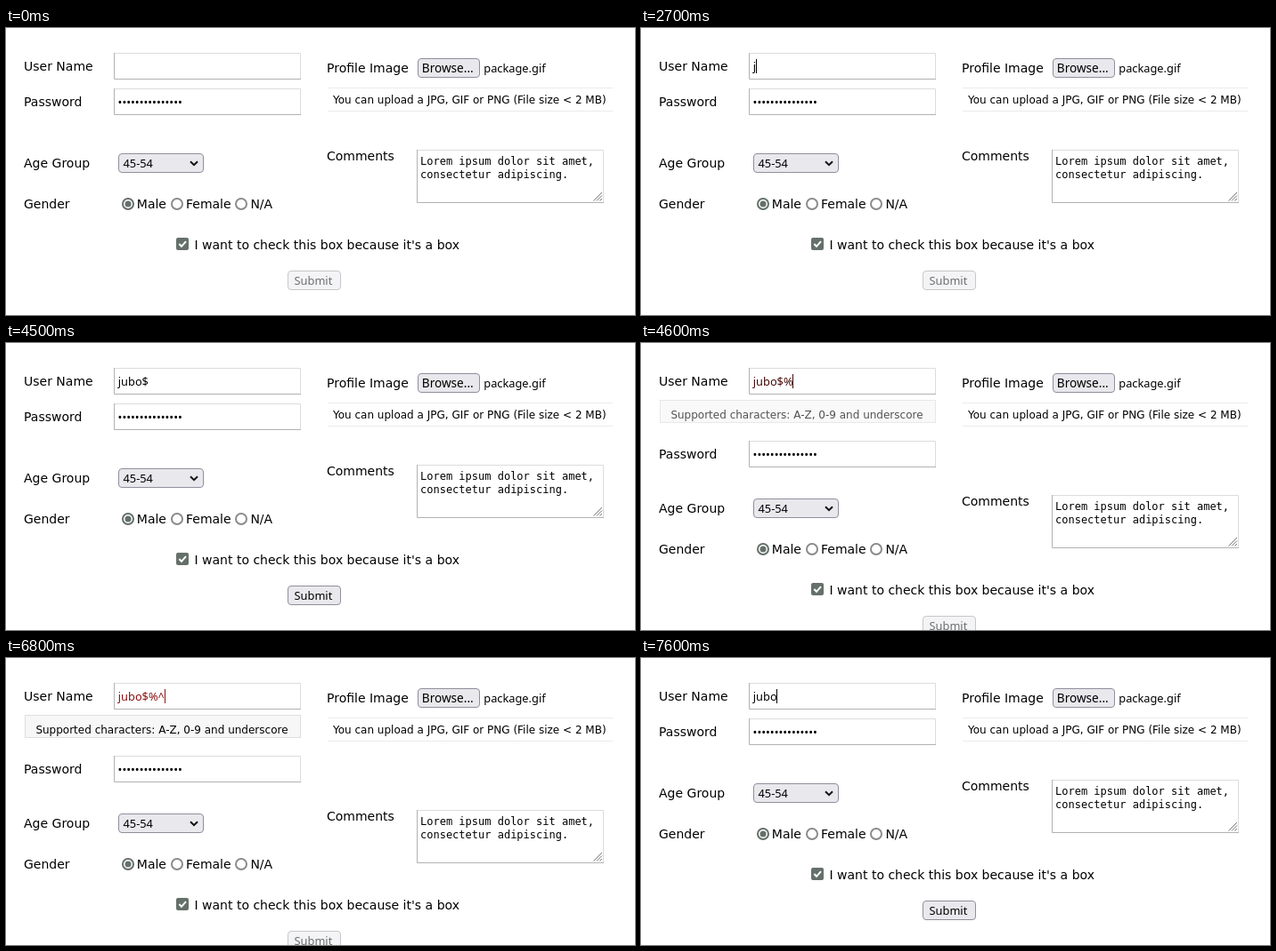
An HTML page that plays this animation: 706x323 px, repeating every 8000 ms.

```html
<!DOCTYPE html>
<html lang="en">
<head>
<meta charset="utf-8">
<title>Form validation</title>
<style>
  html, body { margin: 0; width: 100%; height: 100%; overflow: hidden; background: #fff; }
  svg { display: block; width: 706px; height: 323px; }
  text { white-space: pre; }
  .label { font: 14px "DejaVu Sans", sans-serif; }
  .note { font: 12px "DejaVu Sans", sans-serif; }
  .mono { font: 12px "DejaVu Sans Mono", monospace; }
  .ui { font: 12.8px "Noto Sans", sans-serif; }
  .light, .dark, .ring, .mark { fill: none; }
  .light { stroke: #dcdcdc; }
  .dark { stroke: #b2b2b2; }
  .button { fill: #e9e9ed; stroke: #8f8f9d; }
  .ring { stroke: #8b8b8b; stroke-width: 2; }
  .accent { fill: #65706a; }
  .ring.on { stroke: #65706a; }
  .mark { stroke-width: 2; }
  .off .button { fill: #f4f4f6; stroke: #c7c7cb; }
  .off text { fill: #6b6f6f; }
</style>
</head>
<body>
<svg viewBox="0 0 706 323">
  <defs>
    <g id="field">
      <path class="light" d="M0 .5H209.5V30"/>
      <path class="dark" d="M.5 0V29.5H210"/>
    </g>
  </defs>

  <text class="label" x="20" y="48">User Name</text>
  <use href="#field" x="121" y="28"/>
  <text class="ui" id="name" x="125.8" y="48"></text>
  <rect id="caret" y="35" width="1" height="16"/>

  <g id="hint">
    <rect x="21.5" y="64.5" width="309" height="25" fill="#f7f7f7" stroke="#dedede"/>
    <text class="note" x="33.4" y="81" dy="4">Supported characters: A-Z, 0-9 and underscore</text>
  </g>

  <text class="label" x="360" y="50">Profile Image</text>
  <rect class="button" x="462.5" y="34.5" width="69" height="21" rx="3.5"/>
  <text class="ui" x="466.8" y="50" style="font-size:13.6px">Browse...</text>
  <text class="ui" x="536.3" y="50">package.gif</text>
  <path d="M361 67.5H681M361 93.5H681" stroke="#ebebeb"/>
  <text class="note" x="367" y="85">You can upload a JPG, GIF or PNG (File size &lt; 2 MB)</text>

  <g id="password">
    <text class="label" x="20" y="88">Password</text>
    <use href="#field" x="121" y="68"/>
    <text class="ui" x="125.6" y="88">•••••••••••••••</text>
  </g>

  <g id="rest">
    <text class="label" x="20" y="157">Age Group</text>
    <rect class="button" x="126.5" y="141.5" width="95" height="21" rx="3.5"/>
    <text class="ui" x="131.5" y="157">45-54</text>
    <path class="mark" d="M207 150.2L211 154.2L215 150.2" stroke="#111"/>

    <text class="label" x="20" y="203">Gender</text>
    <circle class="ring on" cx="137" cy="198" r="6"/>
    <circle class="accent" cx="137" cy="198" r="3.5"/>
    <text class="label" x="146.8" y="203">Male</text>
    <circle class="ring" cx="192" cy="198" r="6"/>
    <text class="label" x="202" y="203">Female</text>
    <circle class="ring" cx="264" cy="198" r="6"/>
    <text class="label" x="274.4" y="203">N/A</text>

    <text class="label" x="360" y="149">Comments</text>
    <path class="light" d="M461 137.5H670.5V197"/>
    <path class="dark" d="M461.5 137V196.5H671"/>
    <text class="mono" x="465" y="154">Lorem ipsum dolor sit amet,</text>
    <text class="mono" x="465" y="169">consectetur adipiscing.</text>
    <path d="M659.5 194.5L669 185M663 194.5L669 188.5M666.5 194.5L669 192" stroke="#777"/>

    <rect class="accent" x="191" y="236" width="14" height="14" rx="2"/>
    <path class="mark" d="M194.3 243L197 245.8L202 240.2" stroke="#fff"/>
    <text class="label" x="211.5" y="249">I want to check this box because it's a box</text>

    <g id="submit">
      <rect class="button" x="316.5" y="273.5" width="59" height="21" rx="3.5"/>
      <text class="ui" x="323.6" y="289">Submit</text>
    </g>
  </g>
</svg>

<script>
const LOOP = 8000;
const ENTRY = 'jubo$%^&*';

// start ms, typed characters, caret shown, text colour, hint opacity, submit enabled
const STEPS = [
  [0, 0, 0, '#000', 0, 0],
  [900, 0, 1, '#000', 0, 0],
  [2100, 0, 0, '#000', 0, 0],
  [2700, 1, 1, '#000', 0, 0],
  [2800, 1, 1, '#000', 0, 1],
  [3000, 2, 1, '#000', 0, 1],
  [3300, 3, 0, '#000', 0, 1],
  [3400, 3, 1, '#000', 0, 1],
  [3600, 4, 1, '#000', 0, 1],
  [4400, 5, 1, '#000', 0, 1],
  [4500, 5, 0, '#000', 0, 1],
  [4600, 6, 1, '#450808', .68, 0],
  [4800, 8, 1, '#650c0c', .9, 0],
  [4900, 9, 1, '#7c1010', 1, 0],
  [5700, 9, 0, '#851212', 1, 0],
  [6600, 8, 1, '#851212', 1, 0],
  [6800, 7, 1, '#8b1212', 1, 0],
  [7000, 6, 1, '#8b1212', 1, 0],
  [7200, 5, 1, '#8b1212', 1, 0],
  [7400, 4, 1, '#8b1212', .85, 0],
  [7500, 4, 1, '#560a0a', .5, 1],
  [7600, 4, 1, '#000', 0, 1]
];

const $ = id => document.getElementById(id);
const [name, caret, hint, password, rest, submit] =
  ['name', 'caret', 'hint', 'password', 'rest', 'submit'].map($);
const shift = (el, y) => el.setAttribute('transform', `translate(0 ${y})`);
let shown;

function show([, count, caretOn, color, opacity, enabled]) {
  name.textContent = ENTRY.slice(0, count);
  name.style.fill = caret.style.fill = color;
  const width = count ? name.getComputedTextLength() : 0;
  caret.setAttribute('x', Math.round(125.6 + width));
  caret.style.opacity = caretOn;
  hint.style.opacity = opacity;
  shift(password, opacity ? 42 : 0);
  shift(rest, opacity ? 34 : 0);
  submit.setAttribute('class', enabled ? '' : 'off');
}

function tick() {
  const t = performance.now() % LOOP;
  const step = STEPS.findLast(s => s[0] <= t);
  if (step !== shown) show(shown = step);
  requestAnimationFrame(tick);
}
tick();
</script>
</body>
</html>
```
